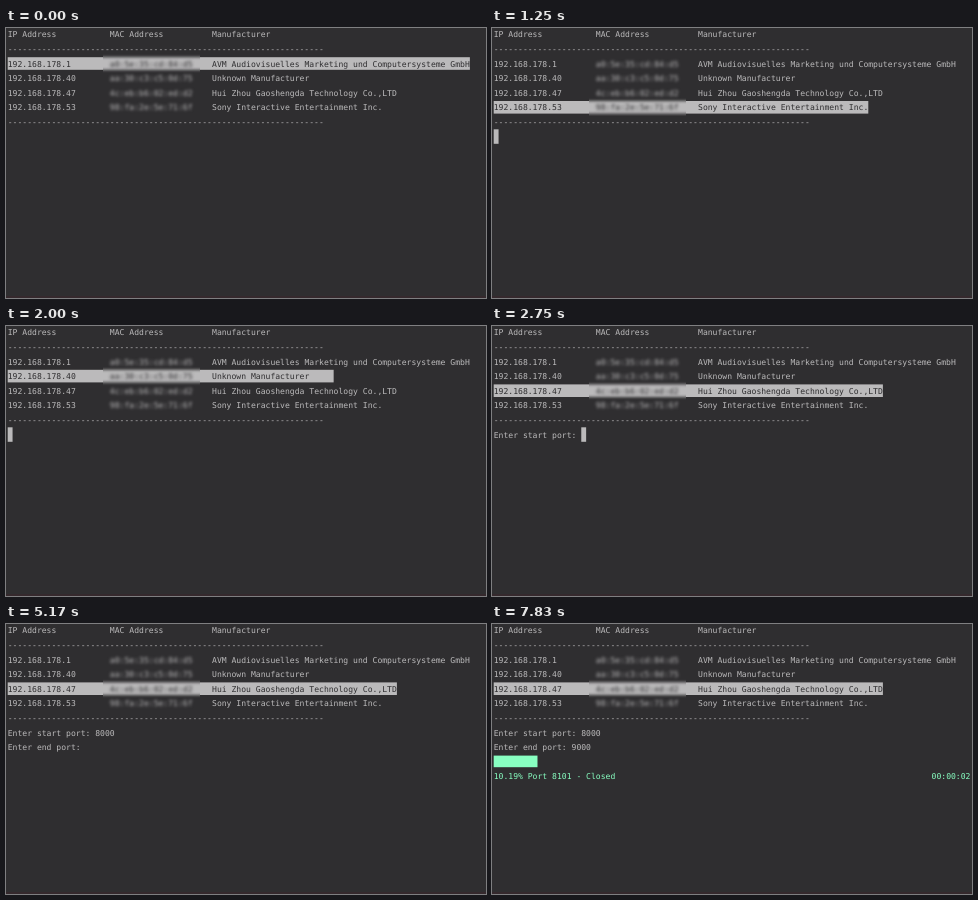
Recreate the animation shown at these times as an HTML page with a canvas. Size 480x270 px, loop 8 s.

```html
<!DOCTYPE html>
<html lang="en">
<head>
<meta charset="utf-8">
<title>Port scanner</title>
<style>
  html, body { margin: 0; width: 100%; height: 100%; overflow: hidden; background: #2f2e30; }
  canvas { display: block; width: 480px; height: 270px; }
</style>
</head>
<body>
<canvas id="stage" width="480" height="270"></canvas>
<script>
const ctx = document.getElementById('stage').getContext('2d');
const LOOP = 8000;
const BG = '#2f2e30', FG = '#bbbabb', GREEN = '#88ffc1';
const LEFT = 1.7, CELL = 4.865, LINE = 14.6;
const RULE = '-'.repeat(65);

const hosts = [
  ['192.168.178.1', 'a0:5e:35:cd:84:d5', 'AVM Audiovisuelles Marketing und Computersysteme GmbH'],
  ['192.168.178.40', 'aa:30:c3:c5:0d:75', 'Unknown Manufacturer'],
  ['192.168.178.47', '4c:eb:b6:02:ed:d2', 'Hui Zhou Gaoshengda Technology Co.,LTD'],
  ['192.168.178.53', '98:fa:2e:5e:71:6f', 'Sony Interactive Entertainment Inc.'],
];

// Each track is a list of [start time, value]
const selection = [[0, 0], [580, 1], [915, 2], [1248, 3], [1580, 0], [1915, 1], [2248, 2]];
const cursorOn = [[0, 0], [170, 1], [580, 0], [665, 1], [2580, 0], [2750, 1],
  [3420, 0], [3830, 1], [5170, 0], [5330, 1], [6000, 0]];
const startPort = [[0, ''], [4000, '8'], [4170, '80'], [4330, '800'], [4500, '8000']];
const endPort = [[0, ''], [5330, '90'], [5500, '900'], [5670, '9000']];
const seconds = [[0, 0], [6670, 1], [7420, 2]];
const scanned = [[0, 1], [7420, 102]];

const START_PROMPT = 2750, END_PROMPT = 4830, SCAN = 6000;
const FIRST = 8000, TOTAL = 1001, BAR_CELLS = 97;

function at(track, t) {
  let value = track[0][1];
  for (const [time, next] of track) if (t >= time) value = next;
  return value;
}

const colX = col => LEFT + col * CELL;

function print(text, row, col = 0, color = FG) {
  ctx.fillStyle = color;
  ctx.fillText(text, colX(col), row * LINE + 9.4);
}

function block(row, col, cells, color, top, height) {
  ctx.fillStyle = color;
  ctx.fillRect(colX(col), row * LINE + top, cells * CELL, height);
}

function drawHosts(selected) {
  hosts.forEach(([ip, mac, maker], i) => {
    const row = i + 2;
    const color = i === selected ? BG : FG;
    if (i === selected) block(row, 0, 42 + Math.max(25, maker.length), FG, 0, 12.6);
    print(ip, row, 0, color);
    print(mac, row, 21, color);
    print(maker, row, 42, color);
  });
}

function drawTable(selected) {
  print('IP Address', 0);
  print('MAC Address', 0, 21);
  print('Manufacturer', 0, 42);
  print(RULE, 1);
  drawHosts(selected);
  print(RULE, 6);

  // Blurred address column
  ctx.save();
  ctx.beginPath();
  ctx.rect(97, 26, 97, 62);
  ctx.clip();
  ctx.fillStyle = BG;
  ctx.fillRect(97, 26, 97, 62);
  ctx.filter = 'blur(1.7px)';
  drawHosts(selected);
  ctx.restore();
}

function drawPrompts(t) {
  let row = 7, line = '';
  if (t >= START_PROMPT) {
    line = 'Enter start port: ' + at(startPort, t);
    print(line, row);
  }
  if (t >= END_PROMPT) {
    line = 'Enter end port: ' + at(endPort, t);
    print(line, ++row);
  }
  if (at(cursorOn, t)) block(row, line.length, 1, FG, -0.9, 14.5);
}

function drawScan(t) {
  const count = at(scanned, t);
  const part = count / TOTAL;
  block(9, 0, Math.floor(part * BAR_CELLS), GREEN, 0.2, 11.6);
  print(`${(part * 100).toFixed(2)}% Port ${FIRST + count - 1} - Closed`, 10, 0, GREEN);
  print('00:00:0' + at(seconds, t), 10, 90, GREEN);
}

function draw(t) {
  ctx.fillStyle = BG;
  ctx.fillRect(0, 0, 480, 270);
  ctx.fillStyle = '#35292d';
  ctx.fillRect(0, 268, 480, 2);
  ctx.font = '8.08px "DejaVu Sans Mono", monospace';
  ctx.textRendering = 'geometricPrecision';
  drawTable(at(selection, t));
  drawPrompts(t);
  if (t >= SCAN) drawScan(t);
}

const began = performance.now();
function tick() {
  draw((performance.now() - began) % LOOP);
  requestAnimationFrame(tick);
}
tick();
</script>
</body>
</html>
```
